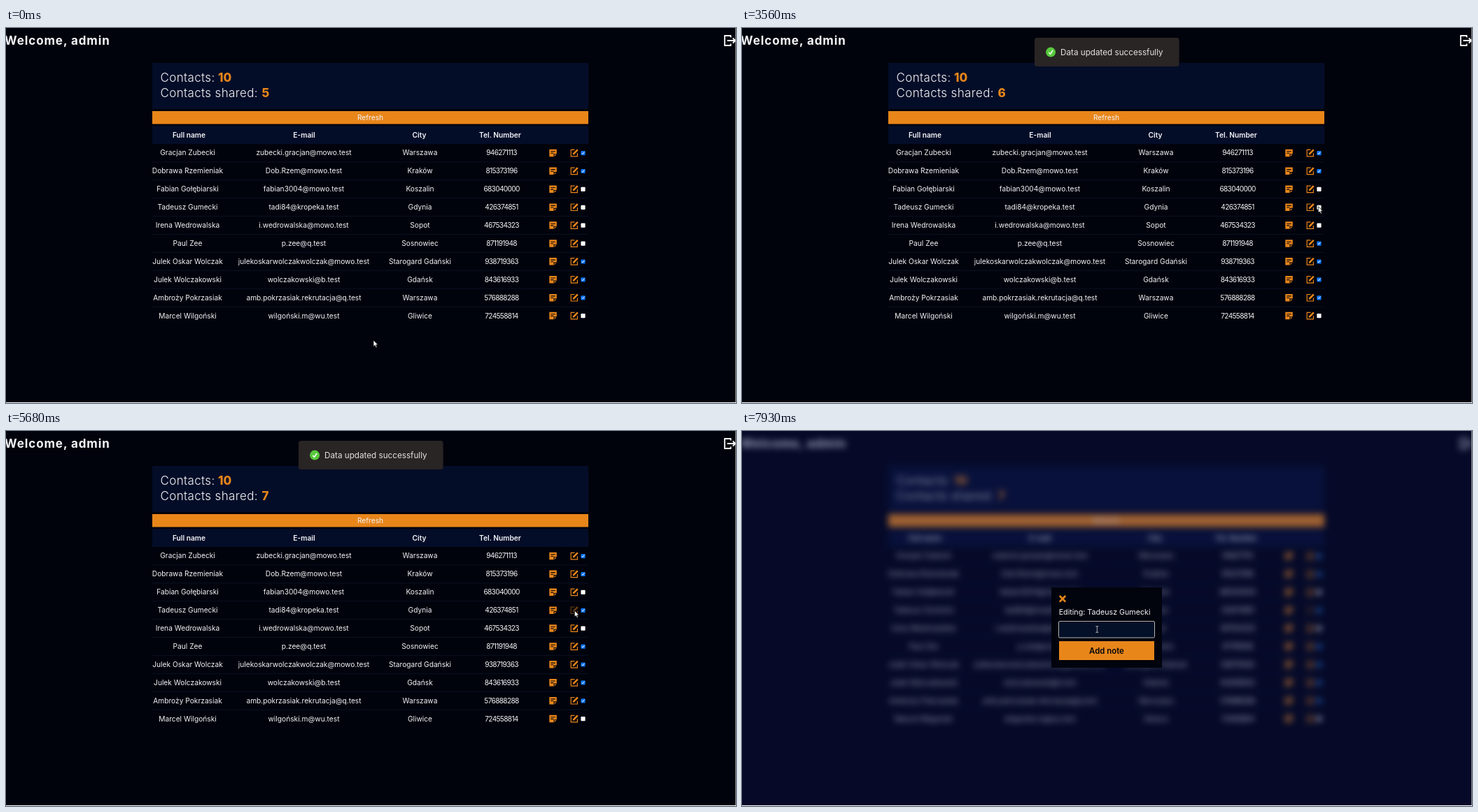
Animation of 1043 by 537 pixels, one loop 8000 ms. Source, as an HTML page:

```html
<!DOCTYPE html>
<html lang="en">
<head>
<meta charset="utf-8">
<title>Contacts</title>
<style>
  html, body { margin: 0; height: 100%; overflow: hidden; background: #01030c; }
  svg { display: block; width: 100vw; height: 100vh; font-family: Inter, "Open Sans", sans-serif; }
  text { fill: #f4f5f8; white-space: pre; }
  .mid { text-anchor: middle; }
  .h1 { font-size: 17px; font-weight: 700; letter-spacing: .9px; }
  .stat { font-size: 17px; font-weight: 300; letter-spacing: .35px; }
  .num { font-size: 17px; font-weight: 800; fill: #e8861a; }
  .th { font-size: 10.2px; font-weight: 600; }
  .td { font-size: 10.2px; }
  .tel { font-size: 10.1px; letter-spacing: -.65px; }
  .line { fill: none; stroke-linecap: butt; }
</style>
</head>
<body>
<svg viewBox="0 0 1043 537" preserveAspectRatio="none">
  <rect width="1043" height="537" fill="#01030c"/>
  <g id="page">
    <text class="h1" x="-2" y="23.5">Welcome, admin</text>
    <path class="line" stroke="#fff" stroke-width="1.8" stroke-linejoin="round" d="M1035.5 13.5V11H1026.8V25H1035.5V22.5M1030.5 18H1042M1038.5 14.5L1042 18L1038.5 21.5"/>
    <g id="table">
      <rect x="209" y="50" width="623" height="66" fill="#040d28"/>
      <text class="stat" x="220.5" y="77.3">Contacts:</text>
      <text class="num" x="303" y="77.3">10</text>
      <text class="stat" x="220.5" y="99.3">Contacts shared:</text>
      <text class="num" id="shared" x="365.5" y="99.3"></text>
      <rect x="209" y="119" width="623" height="18.5" fill="#e8861a"/>
      <text class="td mid" x="520.5" y="131.7">Refresh</text>
      <rect x="209" y="140" width="623" height="26" fill="#040d28"/>
      <g id="rows"></g>
    </g>
    <path id="spinner" class="line" stroke="#fff" stroke-width="5.6" d="M547.2 282A26 26 0 1 1 521.2 256"/>
  </g>
  <g id="modal">
    <rect width="1043" height="537" fill="#121c60" opacity=".35"/>
    <rect x="442" y="224" width="158" height="115" fill="#01040d"/>
    <path class="line" stroke="#e8861a" stroke-width="2.6" d="M453.8 236L462.2 244.6M462.2 236L453.8 244.6"/>
    <text x="452.7" y="263.4" font-size="10.7">Editing: Tadeusz Gumecki</text>
    <rect x="453" y="273.5" width="136" height="22.5" fill="#041028"/>
    <rect id="focus" x="452.5" y="272.5" width="137" height="23.5" rx="1.5" fill="none" stroke="#c9c7c0" stroke-width=".9"/>
    <rect id="caret" x="455.5" y="277" width="1" height="14" fill="#fff"/>
    <rect x="453" y="301" width="136" height="27" fill="#e8861a"/>
    <text class="mid" x="521" y="318.8" font-size="11.4" font-weight="600" style="fill:#05060c">Add note</text>
  </g>
  <g id="toast">
    <rect x="-103.3" y="-20.5" width="206.6" height="41" rx="3.5" fill="#292524"/>
    <path class="line" stroke="#e0e0e0" stroke-width="1.3" d="M-77.5 2.6A3.7 3.7 0 1 1 -77.5 -2.6"/>
    <circle id="badge" cx="0" cy="0" r="7" fill="#58c93d"/>
    <path id="tick" class="line" stroke="#fff" stroke-width="1.5" d="M-83 .4L-80.8 2.7L-77.2 -2.6"/>
    <text x="-66.3" y="4.3" font-size="11.7" style="fill:#e4e2e0">Data updated successfully</text>
  </g>
  <rect x="1042" width="1" height="537" fill="#8e8e94"/>
  <rect y="536" width="1043" height="1" fill="#fff"/>
  <path id="arrow" fill="#fff" stroke="#000" stroke-width=".7" d="M0 0V9.2L2.1 7.3L3.6 10.6L5.1 9.9L3.7 6.7H6.5Z"/>
  <path id="beam" class="line" stroke="#bbb" stroke-width=".9" d="M-2 -4.3H2M-2 4.3H2M0 -4.3V4.3"/>
</svg>
<script>
const $ = id => document.getElementById(id);
const show = (id, on) => $(id).style.display = on ? '' : 'none';
const label = (cls, x, y, s) => `<text class="${cls}" x="${x}" y="${y}">${s}</text>`;

const people = [
  ['Gracjan Zubecki', 'zubecki.gracjan@mowo.test', 'Warszawa', '946271113', 1],
  ['Dobrawa Rzemieniak', 'Dob.Rzem@mowo.test', 'Kraków', '815373196', 1],
  ['Fabian Gołębiarski', 'fabian3004@mowo.test', 'Koszalin', '683040000', 0],
  ['Tadeusz Gumecki', 'tadi84@kropeka.test', 'Gdynia', '426374851', 0],
  ['Irena Wedrowalska', 'i.wedrowalska@mowo.test', 'Sopot', '467534323', 0],
  ['Paul Zee', 'p.zee@q.test', 'Sosnowiec', '871191948', 0],
  ['Julek Oskar Wolczak', 'julekoskarwolczakwolczak@mowo.test', 'Starogard Gdański', '938719363', 1],
  ['Julek Wolczakowski', 'wolczakowski@b.test', 'Gdańsk', '843616933', 1],
  ['Ambroży Pokrzasiak', 'amb.pokrzasiak.rekrutacja@q.test', 'Warszawa', '576888288', 1],
  ['Marcel Wilgoński', 'wilgoński.m@wu.test', 'Gliwice', '724558814', 0],
];

const icons = i => `
  <path fill="#e8861a" d="M776.3 -5H786.8V2L783.3 5.5H776.3Z"/>
  <path class="line" stroke="#01030c" stroke-width="1.1" d="M778.3 -2H784.8M778.3 .6H782.3M783 5.5V2H786.8"/>
  <g id="edit${i}">
    <path class="line" stroke="#e8861a" stroke-width="1.2" d="M812.5 -4.4H807.2V5.1H816.4V.5"/>
    <path class="line" stroke="#e8861a" stroke-width="2.5" d="M810.3 2.2L816.8 -4.4"/>
  </g>
  <rect id="box${i}" x="821.4" y="-2.7" width="6.2" height="6.2" rx="1"/>
  <path id="mark${i}" class="line" stroke="#fff" stroke-width="1" d="M822.7 .4L824 1.8L826.4 -1.3"/>`;

const heads = [['Full name', 261.5], ['E-mail', 426], ['City', 590.5], ['Tel. Number', 706]];
const columns = [259.5, 425.5, 591.5, 708];
$('rows').innerHTML = heads.map(([s, x]) => label('th mid', x, 156.6, s)).join('') +
  people.map((p, i) => `<g transform="translate(0 ${178.7 + 25.9 * i})">` +
    columns.map((x, c) => label(c == 3 ? 'tel mid' : 'td mid', x, 3.7, p[c])).join('') +
    icons(i) + (i < 9 ? '<path stroke="#0a1122" d="M209 13.2H832"/>' : '') + '</g>').join('');

const ticks = [0];
for (const [a, b, n] of [[100, 860, 9], [950, 1240, 4], [1440, 1440, 1], [1620, 1620, 1], [2090, 2170, 2],
  [2380, 2590, 3], [2730, 2810, 2], [3100, 3560, 6], [3860, 3950, 2], [4120, 4210, 2], [4400, 4870, 6],
  [5100, 5390, 4], [5680, 5680, 1], [5790, 5790, 1], [5880, 5880, 1], [6320, 7050, 9], [7440, 7440, 1], [7930, 7930, 1]])
  for (let i = 0; i < n; i++) ticks.push(n > 1 ? a + (b - a) * i / (n - 1) : a);

// Pointer path: time, x, y.
const path = [[0, 525, 447], [860, 831, 313], [950, 830, 311], [1240, 826, 306.5], [1440, 825, 306.5],
  [1620, 824.5, 306.5], [3010, 824.5, 306.5], [3560, 823.3, 255.5], [5000, 823.3, 255.5],
  [5200, 818, 258.5], [5390, 812.3, 257], [6230, 812.3, 257], [6720, 610, 290], [7050, 507.3, 284], [8000, 507.3, 284]];

function pointer(t) {
  const i = Math.max(1, path.findIndex(k => k[0] >= t));
  const [a, b] = [path[i - 1], path[i]];
  const u = (t - a[0]) / (b[0] - a[0]), e = u * u * (3 - 2 * u);
  return [a[1] + (b[1] - a[1]) * e, a[2] + (b[2] - a[2]) * e];
}

const bezier = (x1, y1, x2, y2) => x => {
  if (x <= 0) return 0;
  if (x >= 1) return 1;
  const at = (s, p, q) => 3 * s * (1 - s) ** 2 * p + 3 * s * s * (1 - s) * q + s ** 3;
  let lo = 0, hi = 1;
  for (let i = 0; i < 20; i++) {
    const s = (lo + hi) / 2;
    if (at(s, x1, x2) < x) lo = s; else hi = s;
  }
  return at(lo, y1, y2);
};
const easeIn = bezier(.21, 1.02, .73, 1), easeOut = bezier(.06, .71, .55, 1), pop = bezier(.175, .885, .32, 1.275);

const toasts = [[2297, 3842, 3950], [4317, 5772, 5880]];
function drawToast(t) {
  const run = toasts.find(([start, , end]) => t >= start && t < end);
  show('toast', run);
  if (!run) return;
  const age = t - run[0];
  const hidden = 1 - easeIn(age / 350), gone = easeOut((t - run[1]) / 400);
  const y = 34.6 - 82 * hidden - 61.5 * gone, scale = 1 - .4 * (hidden + gone);
  $('toast').setAttribute('transform', `translate(521.3 ${y}) scale(${scale})`);
  $('toast').setAttribute('opacity', 1 - .5 * hidden - gone);
  $('badge').setAttribute('transform', `translate(-80.2 0) scale(${pop((age - 100) / 300)})`);
  show('tick', age > 300);
}

function draw(t) {
  const first = t >= 2380, second = t >= 4400;
  const loading = first && t < 2590 || second && t < 4580;
  const modal = t >= 5790;

  show('table', !loading);
  show('spinner', loading);
  $('spinner').setAttribute('transform', `rotate(${(t - (second ? 4400 : 2380)) * .36} 521.2 282)`);
  $('shared').textContent = 5 + first + second;

  people.forEach((p, i) => {
    const on = p[4] || i == 5 && first || i == 3 && second;
    const pressed = i == 5 && t >= 2090 && t < 2170 || i == 3 && t >= 4120 && t < 4210;
    $('box' + i).setAttribute('fill', on ? '#0b74f2' : pressed ? '#c8c8c8' : '#fff');
    show('mark' + i, on);
  });
  $('edit3').setAttribute('opacity', t >= 5390 ? .45 : 1);

  $('page').style.filter = modal ? 'blur(5px)' : '';
  show('modal', modal);
  show('focus', t >= 7440);
  show('caret', t >= 7440 && t < 7930);
  drawToast(t);

  const [x, y] = pointer(t);
  const typing = modal && x > 453 && x < 589 && y > 273 && y < 296;
  show('arrow', !typing);
  show('beam', typing);
  $(typing ? 'beam' : 'arrow').setAttribute('transform', `translate(${x} ${y})`);
}

let last = -1;
const begin = performance.now();
function frame() {
  const t = (performance.now() - begin) % 8000;
  const now = ticks.findLast(k => k <= t);
  if (now !== last) draw(last = now);
  requestAnimationFrame(frame);
}
frame();
</script>
</body>
</html>
```
